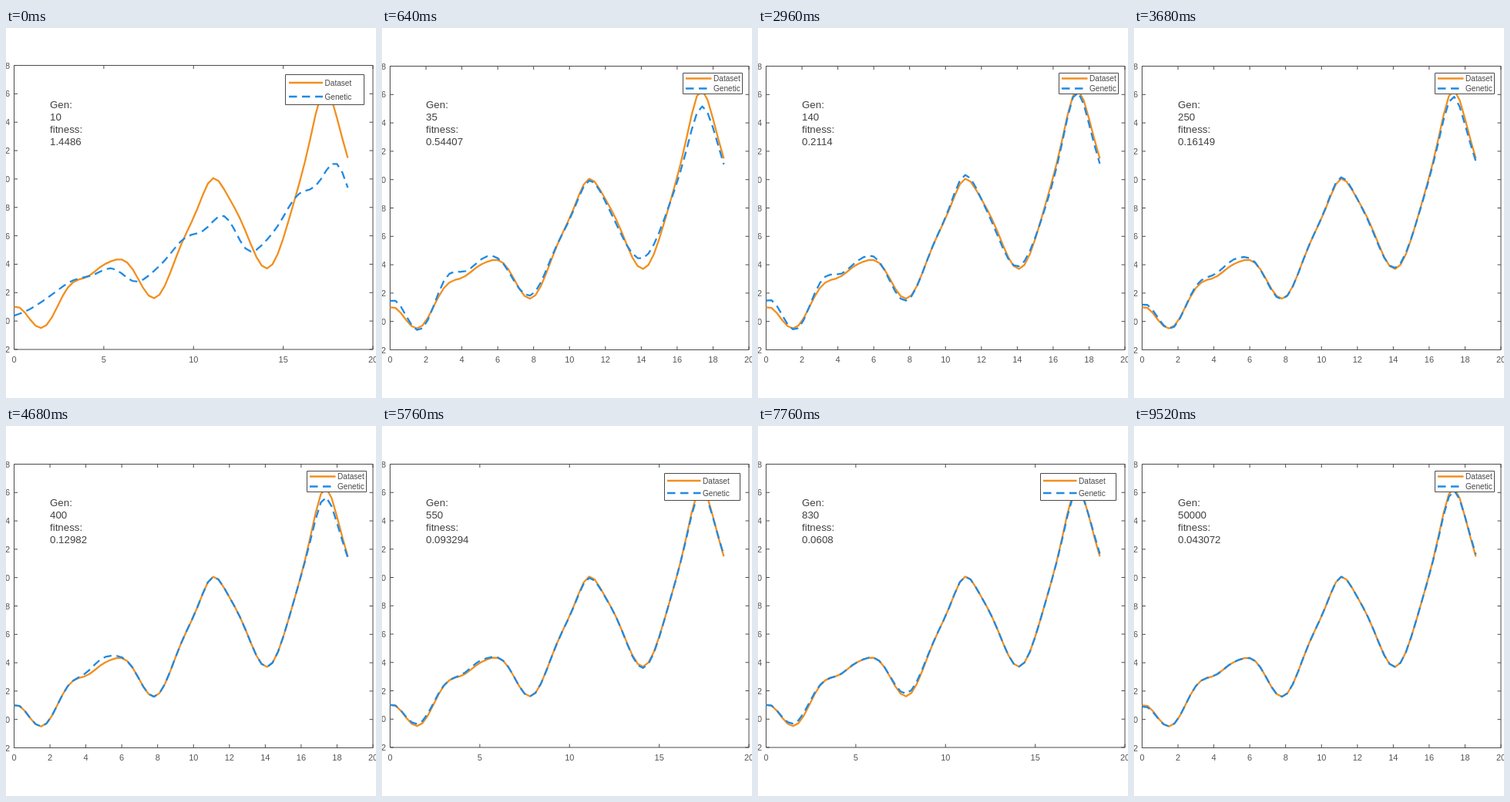
Write an HTML page with a canvas that moves like this. It is 480 px wide and 480 px high and loops after 9.76 s.

```html
<!DOCTYPE html>
<html lang="en">
<head>
<meta charset="utf-8">
<title>Genetic curve fit</title>
<style>
html, body { margin: 0; width: 100%; height: 100%; overflow: hidden; background: #fff; }
canvas { display: block; }
</style>
</head>
<body>
<canvas id="c" width="480" height="480"></canvas>
<script>
const ctx = document.getElementById('c').getContext('2d');
const { sin, cos, log, abs, floor, round, PI } = Math;
const ORANGE = '#f28f1f', BLUE = '#1f8ae4', INK = '#4a4a4a';
const FONT = '"Liberation Sans", Arial, sans-serif';
const STEP = 40, LOOP = 9760;
const LEFT = 10.5, RIGHT = 476, DASH = [10.5, 6.5];

const dataset = x => cos(2 * x) + x / (2 + sin(x));

const firstGuess = x => 0.38 + (0.45 - 0.045 * x) * (1 - cos(x)) + x * (0.496
  - 0.055 * cos(x) - 0.11 * sin(x) - 0.04 * sin(2 * x)
  - 0.015 * cos(3 * x) - 0.01 * sin(3 * x));

// The dataset plus smooth bumps, each given as [centre, height]
const bump = d => abs(d) < PI / 2 ? cos(d) ** 2 : 0;
const fit = (...bumps) => x =>
  bumps.reduce((y, [centre, height]) => y + height * bump(x - centre), dataset(x));

const stages = [
  { step: 0, gen: 10, fitness: 1.4486, curve: firstGuess },
  { step: 38, gen: 69, fitness: 0.32006, curve: fit([0.2, 0.75], [1.8, -0.7], [3.4, 0.75],
    [5.4, 0.6], [7.7, -0.2], [11, 0.6], [14.3, 0.45], [16, -0.15]) },
  { step: 74, gen: 140, fitness: 0.2114, curve: fit([0.4, 0.55], [1.8, -0.2], [3.3, 0.42],
    [5.6, 0.32], [7.2, -0.2], [11, 0.27], [13, -0.27], [14.4, 0.27], [16, -0.27], [18.3, -0.4]) },
  { step: 117, gen: 400, fitness: 0.12982, curve: fit([4.8, 0.42], [17.4, -0.65]) },
  { step: 172, gen: 705, fitness: 0.072108,
    curve: fit([1.8, 0.25], [11, -0.15], [14.1, -0.15], [18.6, 0.2]) },
  { step: 194, gen: 830, fitness: 0.0608, curve: fit([1.9, 0.2], [8, 0.2], [17.2, -0.2], [18.6, 0.2]) },
  { step: 238, gen: 50000, fitness: 0.043072, curve: fit([0, -0.1], [17.2, -0.2], [18.6, 0.15]) }
];

const layouts = {
  start: { top: 48.5, bottom: 417, tick: 5, box: [362.5, 60.5, 102, 39], x: 367, len: 44, rows: [71, 89] },
  small: { top: 49.5, bottom: 417.5, tick: 2, box: [390.5, 58.5, 77, 27], x: 394, len: 33.5, rows: [65.5, 78.5] },
  large: { top: 49.5, bottom: 417, tick: 5, box: [366.5, 61.5, 98, 35], x: 370, len: 43.5, rows: [71, 87] }
};
const layoutAt = n =>
  n < 1 ? layouts.start : n < 121 || n >= 233 ? layouts.small : layouts.large;

function generationAt(n) {
  if (n >= 238) return 50000;
  if (n >= 233) return round(50 ** ((n - 232) / 6)) * 1000;
  if (n >= 194) return Math.min(1000, 830 + (n - 194) * 5);
  const i = stages.findIndex(s => s.step > n), a = stages[i - 1], b = stages[i];
  const gen = a.gen + (b.gen - a.gen) * (n - a.step) / (b.step - a.step);
  return gen < 140 ? round(gen) : round(gen / 5) * 5;
}

// Fitness follows a power law between stages; the curve morphs along with it
function solve(gen) {
  const i = Math.max(1, stages.findIndex(s => s.gen >= gen));
  const a = stages[i - 1], b = stages[i];
  const u = log(gen / a.gen) / log(b.gen / a.gen);
  const fitness = a.fitness * (b.fitness / a.fitness) ** u;
  const w = (a.fitness - fitness) / (a.fitness - b.fitness);
  return { fitness, curve: x => a.curve(x) * (1 - w) + b.curve(x) * w };
}

function text(str, x, y, size, align = 'left', color = '#555') {
  ctx.font = `${size}px ${FONT}`;
  ctx.textAlign = align;
  ctx.fillStyle = color;
  ctx.fillText(str, x, y);
}

function stroke(color, width, path, dash = []) {
  ctx.strokeStyle = color;
  ctx.lineWidth = width;
  ctx.setLineDash(dash);
  ctx.beginPath();
  path();
  ctx.stroke();
}

function line(x1, y1, x2, y2) {
  ctx.moveTo(x1, y1);
  ctx.lineTo(x2, y2);
}

const toX = v => LEFT + v / 20 * (RIGHT - LEFT);
const toY = (v, { top, bottom }) => bottom - (v + 2) / 20 * (bottom - top);

function plot(curve, layout) {
  for (let i = 0; i <= 62; i++) {
    const x = i * 0.3;
    ctx.lineTo(toX(x), toY(curve(x), layout));
  }
}

function axes(layout) {
  const { top, bottom, tick } = layout;
  stroke(INK, 1, () => {
    ctx.rect(LEFT, top, RIGHT - LEFT, bottom - top);
    for (let v = 0; v <= 20; v += tick) {
      const x = toX(v);
      line(x, bottom, x, bottom - 4.5);
      line(x, top, x, top + 4.5);
      text(v, x, 433.5, 11, 'center');
    }
    for (let v = -2; v <= 18; v += 2) {
      const y = toY(v, layout);
      line(LEFT, y, LEFT + 4.5, y);
      line(RIGHT, y, RIGHT - 4.5, y);
      text(v, 5, y + 4, 11, 'right');
    }
  });
}

function legend({ box, x, len, rows }) {
  ctx.fillStyle = '#fff';
  ctx.fillRect(...box);
  stroke(INK, 1, () => ctx.rect(...box));
  [['Dataset', ORANGE, []], ['Genetic', BLUE, DASH]].forEach(([name, color, dash], i) => {
    stroke(color, 2.3, () => line(x, rows[i], x + len, rows[i]), dash);
    text(name, x + len + 2.5, rows[i] + 3.7, 10.1, 'left', '#484848');
  });
}

function draw(now) {
  const n = floor(now % LOOP / STEP);
  const layout = layoutAt(n), gen = generationAt(n), { fitness, curve } = solve(gen);
  ctx.fillStyle = '#fff';
  ctx.fillRect(0, 0, 480, 480);
  axes(layout);
  ctx.lineJoin = 'round';
  stroke(ORANGE, 2.3, () => plot(dataset, layout));
  stroke(BLUE, 2.3, () => plot(curve, layout), DASH);
  legend(layout);
  ['Gen:', gen, 'fitness:', +fitness.toPrecision(5)].forEach((s, i) =>
    text(s, 57, 103.5 + i * 16.1, 13.3, 'left', '#404040'));
}

let start;
function loop(now) {
  start ??= now;
  draw(now - start);
  requestAnimationFrame(loop);
}
draw(0);
requestAnimationFrame(loop);
</script>
</body>
</html>
```
